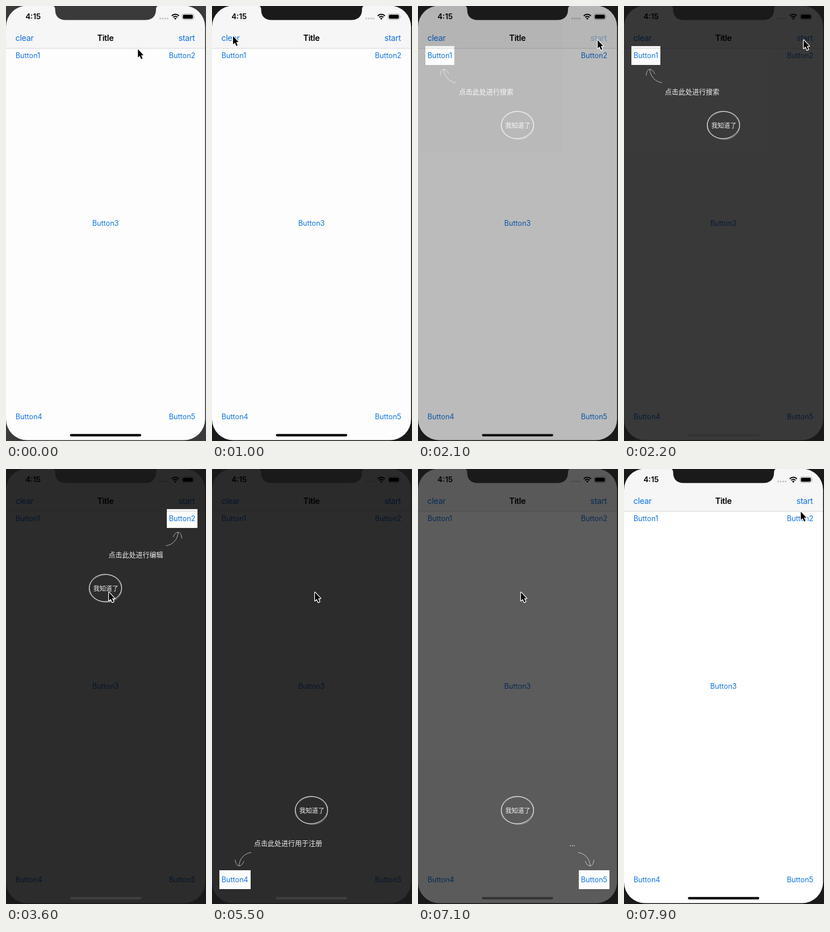
An HTML page that plays this animation: 352 px wide and 760 px high, repeating every 8000 ms.

```html
<!DOCTYPE html>
<html lang="zh">
<head>
<meta charset="utf-8">
<title>Button guide</title>
<style>
  html, body { margin: 0; width: 100%; height: 100%; overflow: hidden; background: #1b1b1b; }
  svg { display: block; width: 100vw; height: 100vh; }
  text { font-family: Inter, Roboto, sans-serif; }
  .nav { font-size: 14.4px; letter-spacing: -.35px; }
  .btn { font-size: 12.7px; letter-spacing: -.05px; }
  .link { fill: #1374e4; }
  .bold { font-weight: 600; }
  .guide text {
    font-family: "Noto Sans CJK SC", "Noto Sans CJK", "Noto Sans CJK JP", sans-serif;
    font-weight: 300; fill: #fff; fill-opacity: .92;
  }
  .ink { fill: none; stroke: #fff; stroke-opacity: .8; stroke-linecap: round; stroke-linejoin: round; }
</style>
</head>
<body>
<svg viewBox="0 0 352 760" preserveAspectRatio="none">
  <rect id="page" width="352" height="760"/>
  <rect width="352" height="74" fill="#f6f6f6"/>
  <rect y="73.6" width="352" height=".8" fill="#cbcbcb"/>

  <text class="bold" x="34.2" y="23.4" font-size="13.4">4:15</text>
  <g fill="#c4c4c4">
    <circle cx="271.5" cy="21.8" r="1.6"/><circle cx="275.8" cy="21.8" r="1.6"/>
    <circle cx="280.1" cy="21.8" r="1.6"/><circle cx="284.4" cy="21.8" r="1.6"/>
  </g>
  <path d="M291.7 17.2A8.8 8.8 0 0 1 304.3 17.2M294.2 19.8A5.3 5.3 0 0 1 301.8 19.8"
    fill="none" stroke="#000" stroke-width="2"/>
  <path d="M298 24L295.9 21.8A3 3 0 0 1 300.1 21.8Z"/>
  <rect x="309.9" y="13.7" width="20.4" height="10" rx="3" fill="none" stroke="#a2a2a2" stroke-width=".9"/>
  <rect x="311.4" y="15.2" width="17.4" height="7" rx="1.7"/>
  <path d="M331.3 17.2Q332.8 18.7 331.3 20.2Z" fill="#a2a2a2"/>

  <text class="nav link" x="16.6" y="60.6">clear</text>
  <text class="nav bold" x="175" y="60.6" text-anchor="middle">Title</text>
  <text class="nav link" id="start" x="303.4" y="60.6">start</text>
  <g id="buttons"></g>

  <g id="overlay">
    <path id="dim" fill-rule="evenodd" fill-opacity=".822"/>
    <g class="guide">
      <path class="ink" id="arrow" stroke-width=".8"
        d="M28 31C17 29.5 8 21 7 8M.5 18C1 12 3.5 7.6 7 7.6C10.5 7.6 14 11 15.5 15.5"/>
      <text id="label" font-size="12"></text>
      <g id="ok">
        <ellipse class="ink" rx="28.6" ry="24" stroke-width="1"/>
        <ellipse class="ink" rx="28.9" ry="23.3" stroke-width=".5" transform="rotate(-9)"/>
        <ellipse class="ink" rx="28.4" ry="24.3" stroke-width=".4" transform="translate(.3 .5) rotate(14)"/>
        <text x=".8" y="4.6" font-size="11" text-anchor="middle">我知道了</text>
      </g>
    </g>
  </g>
  <rect id="home" x="112.5" y="747.7" width="125.5" height="4.2" rx="2.1"/>

  <g id="bezel">
    <path fill-rule="evenodd" d="M0 0H352V760H0ZM37 -.5H313.4A37 37 0 0 1 350.4 36.5V721.5A37 37 0 0 1 313.4 758.5H37A37 37 0 0 1 0 721.5V36.5A37 37 0 0 1 37 -.5Z"/>
    <path d="M81 -1Q86.5 0 86.5 6C86.5 18 93 24.5 105 24.5H245C257 24.5 264 18 264 6Q264 0 269.5 -1Z"/>
  </g>
  <path id="cursor" d="M1.2 2.6V17L4.4 13.9L7 19.8L9.3 18.8L6.9 13H11Z"
    stroke="#fff" stroke-width="2.5" stroke-linejoin="round" paint-order="stroke"/>
</svg>
<script>
const LOOP = 8000, TICK = 100;
const $ = id => document.getElementById(id);
const set = (id, name, value) => $(id).setAttribute(name, value);
const ramp = (t, from, length) => Math.min(1, Math.max(0, (t - from) / length));
const smooth = p => p * p * (3 - 2 * p);
const mix = (a, b, p) => a + (b - a) * p;
const gray = v => `rgb(${[v, v, v].map(Math.round)})`;

const buttons = [[16.8, 91.3], [286.8, 91.3], [151.8, 383.7], [16.8, 721.8], [286.8, 721.8]];
$('buttons').innerHTML = buttons.map(([x, y], i) =>
  `<text class="btn link" x="${x}" y="${y}">Button${i + 1}</text>`).join('');

// side: 1 puts the label right of the arrow; dir: 1 puts the guide below the hole
const steps = [
  { at: 0, cx: 38.5, w: 51, top: 70, side: 1, dir: 1, label: '点击此处进行搜索' },
  { at: 3400, cx: 310, w: 54, top: 70, side: -1, dir: 1, label: '点击此处进行编辑' },
  { at: 4400, cx: 175, w: 54, top: 363, side: 1, dir: -1, label: '点击此处' },
  { at: 5500, cx: 40.5, w: 55, top: 701, side: 1, dir: -1, label: '点击此处进行用于注册' },
  { at: 6200, cx: 310, w: 54, top: 701, side: -1, dir: -1, label: '...' }
];
const HOLE = 33;

// time, x, y of the pointer tip
const path = [
  [0, 231, 73], [700, 33, 50], [950, 33, 50], [1800, 315, 57], [2600, 315, 57],
  [2900, 180, 213], [7400, 180, 213], [7900, 310, 72], [LOOP, 310, 72]
];

function pointer(t) {
  const i = path.findIndex((p, k) => t < path[k + 1][0]);
  const [t0, x0, y0] = path[i], [t1, x1, y1] = path[i + 1];
  const p = smooth(ramp(t, t0, t1 - t0));
  return [mix(x0, x1, p), mix(y0, y1, p)];
}

function showStep({ cx, w, top, side, dir, label }) {
  const edge = dir > 0 ? top + HOLE : top;
  set('dim', 'd', `M0 -1H352V760H0ZM${cx - w / 2} ${top}h${w}v${HOLE}h${-w}Z`);
  set('arrow', 'transform', `translate(${cx} ${edge}) scale(${side} ${dir})`);
  set('label', 'x', cx + side * 33.5);
  set('label', 'y', edge + dir * 47 + 4.6);
  set('label', 'text-anchor', side > 0 ? 'start' : 'end');
  $('label').textContent = label;
  set('ok', 'transform', `translate(175 ${edge + dir * 105})`);
}

function homeShade(t) {
  if (t >= 7200) return 0;
  return mix(63 * smooth(ramp(t, 2000, 280)), 53, ramp(t, 6500, 600));
}

function draw(t) {
  set('bezel', 'fill', gray(t < 1000 ? 58 : 26));
  set('page', 'fill', t < 7200 ? '#fdfdfd' : '#fff');

  const pressed = t >= 1900 && t < 2300;
  set('start', 'opacity', pressed ? mix(.2, 1, smooth(ramp(t, 2030, 220))) : 1);

  const shown = smooth(ramp(t, 2020, 212)) * (1 - smooth(ramp(t, 7055, 145)));
  set('overlay', 'opacity', shown);
  showStep(steps.filter(s => s.at <= t).pop());
  set('home', 'fill', gray(homeShade(t)));
  set('cursor', 'transform', `translate(${pointer(t)})`);
}

const began = performance.now();
function loop() {
  const t = (performance.now() - began) % LOOP;
  draw(Math.floor((t + 4) / TICK) * TICK % LOOP);
  requestAnimationFrame(loop);
}
loop();
</script>
</body>
</html>
```
